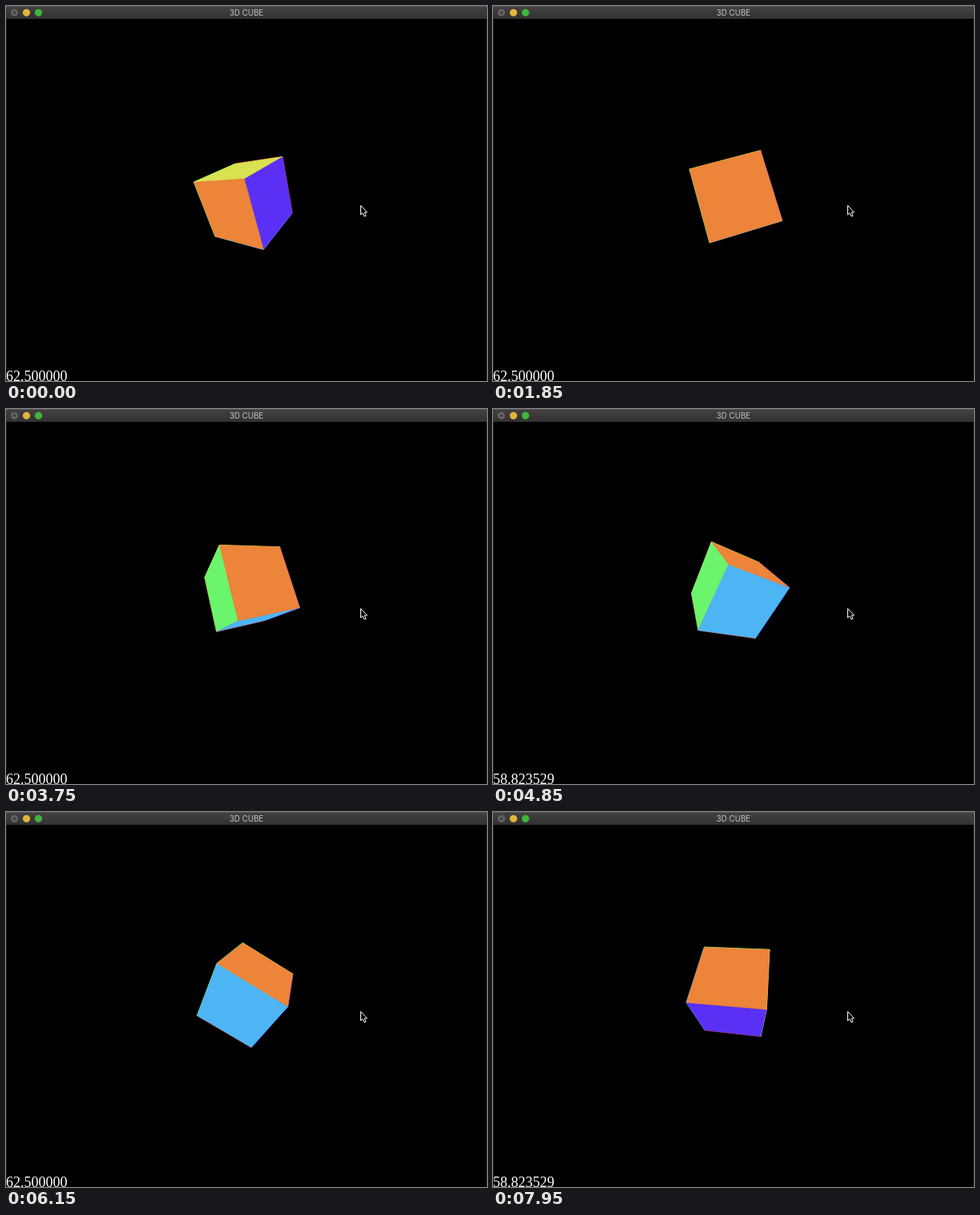
An HTML page for the animation above (8 s loop, 600 px wide and 467 px high).

```html
<!DOCTYPE html>
<html lang="en">
<head>
<meta charset="utf-8">
<title>3D CUBE</title>
<style>
  html, body { margin: 0; width: 100%; height: 100%; overflow: hidden; background: #000; }
  svg { display: block; width: 100%; height: 100%; }
  .title { font: 9.75px Inter, sans-serif; fill: #c4c2c3; text-anchor: middle; }
  .rate { font: 18px "Liberation Serif", serif; fill: #fff; }
</style>
</head>
<body>
<svg viewBox="0 0 600 467">
  <defs>
    <linearGradient id="bar" x2="0" y2="1">
      <stop offset="0" stop-color="#434142"/>
      <stop offset="1" stop-color="#333132"/>
    </linearGradient>
  </defs>
  <rect width="600" height="467"/>
  <path d="M.5 16V467M599.5 16V467" stroke="#1c1c1c"/>
  <rect width="600" height="16" fill="url(#bar)"/>
  <rect width="600" height="1" fill="#565455"/>
  <circle cx="10.5" cy="8.3" r="4.6" fill="#636162"/>
  <circle cx="10.5" cy="8.3" r="1.5" fill="#363435"/>
  <circle cx="25.5" cy="8.3" r="4.6" fill="#e2b53c"/>
  <circle cx="40.5" cy="8.3" r="4.6" fill="#40b53e"/>
  <text class="title" x="300" y="12">3D CUBE</text>
  <g id="cube" stroke-linejoin="round"></g>
  <path d="M442.5 248.5V260L445 257.8L447 262L449 261.1L447.2 257H450.5Z" fill="#000" stroke="#fff"/>
  <text class="rate" id="rate" x="0" y="467"></text>
</svg>
<script>
const LOOP = 8000, STEPS = 120;
const FOCAL = 200, DISTANCE = 2.63, CENTER_X = 300.5, CENTER_Y = 241.5;

const unit = v => v.map(n => n / Math.hypot(...v));
const SWAY = unit([-0.67, -0.73, -0.14]);
const DRIFT = unit([-0.51, -0.84, 0.18]);
const PITCH = unit([-1, -0.06, -0.04]);
const YAW = unit([0, 0.82, 0.57]);

// the cube starts tilted, then turns about one axis after another
const START = { axis: unit([0.54, 0.83, -0.15]), degrees: 47 };
const TURNS = [
  { axis: SWAY, degrees: 53, until: 28 },
  { axis: DRIFT, degrees: 25, until: 56 },
  { axis: PITCH, degrees: 44, until: 73 },
  { axis: YAW, degrees: 34, until: 92 },
  { axis: YAW, degrees: 53.5, until: 103 },
  { axis: YAW, degrees: 29, until: 119 }
];

// opposite faces share an axis: [colour at -1, colour at +1]
const COLORS = [["#6af56c", "#5a30f4"], ["#d9e250", "#4db5f3"], ["#ec8439", "#d8352f"]];

const cube = document.getElementById("cube");
const rate = document.getElementById("rate");

const dot = (a, b) => a[0] * b[0] + a[1] * b[1] + a[2] * b[2];
const cross = (a, b) => [0, 1, 2].map(i => {
  const j = (i + 1) % 3, k = (i + 2) % 3;
  return a[j] * b[k] - a[k] * b[j];
});
const progress = (value, from, to) => Math.min(1, Math.max(0, (value - from) / (to - from)));

function rotate(point, { axis, degrees }, amount = 1) {
  const angle = degrees * amount * Math.PI / 180;
  const cos = Math.cos(angle), sin = Math.sin(angle);
  const side = cross(axis, point), along = dot(axis, point) * (1 - cos);
  return point.map((v, i) => v * cos + side[i] * sin + axis[i] * along);
}

function orient(point, step) {
  let from = 0;
  return TURNS.reduce((turned, turn) => {
    const amount = progress(step, from, turn.until);
    from = turn.until;
    return rotate(turned, turn, amount);
  }, rotate(point, START));
}

function makeFace(axis, side) {
  const color = COLORS[axis][(side + 1) / 2];
  const normal = [0, 0, 0];
  normal[axis] = side / 2;
  const corners = [0, 1, 2, 3].map(i => {
    const corner = [...normal];
    corner[(axis + 1) % 3] = i === 1 || i === 2 ? 0.5 : -0.5;
    corner[(axis + 2) % 3] = i > 1 ? 0.5 : -0.5;
    return corner;
  });
  const polygon = document.createElementNS("http://www.w3.org/2000/svg", "polygon");
  polygon.setAttribute("fill", color);
  polygon.setAttribute("stroke", color);
  cube.append(polygon);
  return { normal, corners, polygon };
}
const faces = [0, 1, 2].flatMap(axis => [makeFace(axis, -1), makeFace(axis, 1)]);

function draw(step) {
  const rise = -0.02 - 0.175 * progress(step, TURNS[0].until, TURNS[1].until);
  const centre = [0, rise, DISTANCE];
  const project = corner => {
    const [x, y, z] = orient(corner, step).map((v, i) => v + centre[i]);
    return [CENTER_X + FOCAL * x / z, CENTER_Y + FOCAL * y / z].map(v => v.toFixed(2)).join();
  };

  const visible = [];
  for (const { normal, corners, polygon } of faces) {
    const outward = orient(normal, step);
    const facing = dot(outward, outward.map((v, i) => v + centre[i])) < 0;
    polygon.setAttribute("points", corners.map(project).join(" "));
    // hidden faces peek out as a thin coloured rim
    polygon.setAttribute("stroke-width", facing ? 0.3 : 1);
    if (facing) visible.push(polygon);
  }
  cube.append(...visible);
  rate.textContent = (1000 / (step % 2 ? 17 : 16)).toFixed(6);
}

const start = performance.now();
let shown = -1;
function tick() {
  const time = (performance.now() - start) % LOOP;
  const step = Math.min(STEPS - 1, Math.floor((time + 20) * STEPS / LOOP));
  if (step !== shown) draw(shown = step);
  requestAnimationFrame(tick);
}
tick();
</script>
</body>
</html>
```
